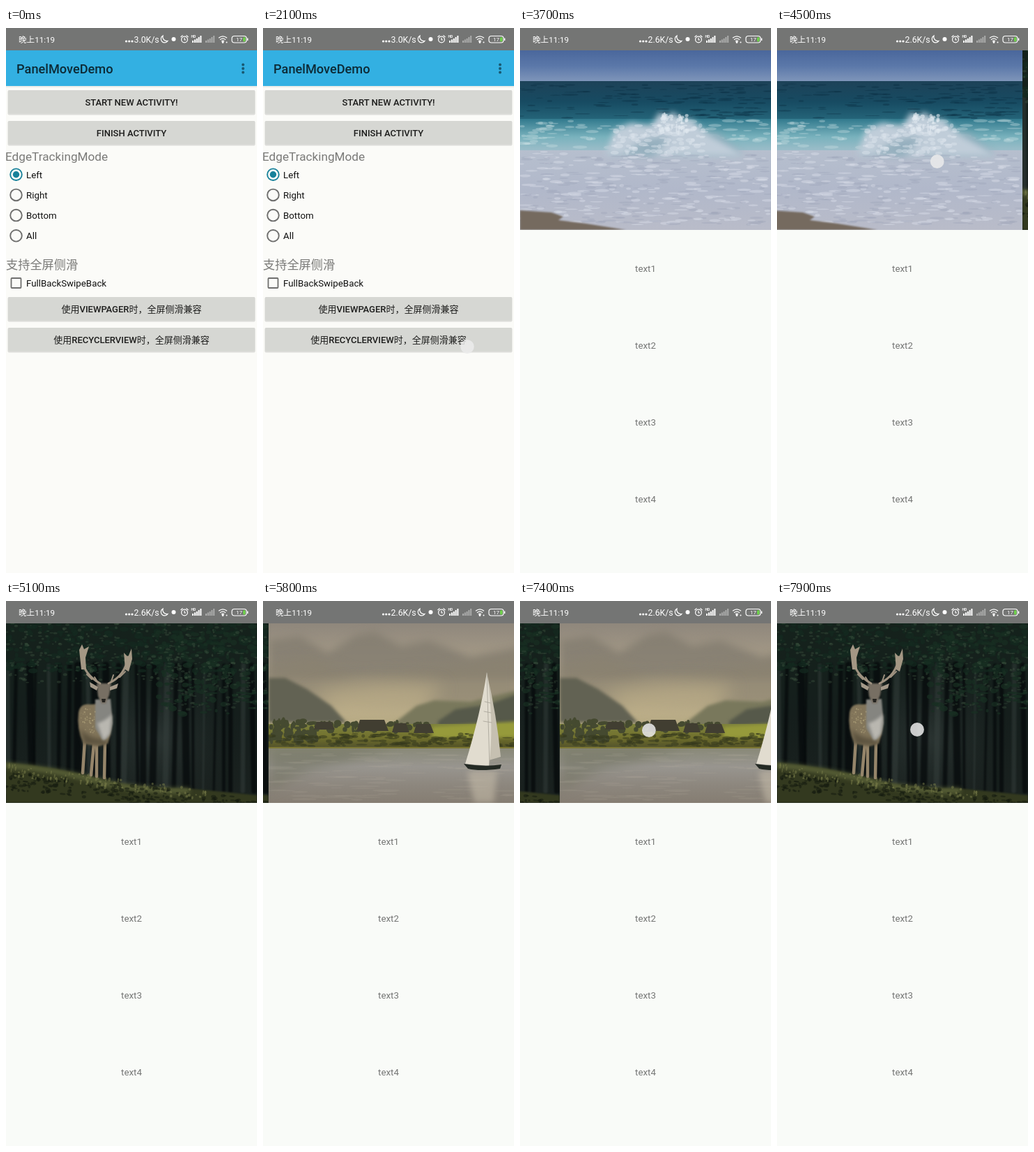
Recreate the animation shown at these times as an HTML page with a canvas. Size 360 px wide and 780 px high, loop 8000 ms.

```html
<!DOCTYPE html>
<html lang="zh">
<head>
<meta charset="utf-8">
<title>PanelMoveDemo</title>
<style>
html, body { margin: 0; width: 100%; height: 100%; overflow: hidden; background: #fbfbf8; }
.layer { position: absolute; left: 0; top: 0; width: 360px; height: 780px; overflow: hidden; }
svg { position: absolute; left: 0; top: 0; font-family: Roboto, "Noto Sans CJK SC", "Noto Sans CJK", sans-serif; }
#main { background: #fbfbf8; }
#detail { background: #f9fbf8; }
#strip { position: absolute; top: 32px; left: 0; width: 1440px; height: 257px; }
#strip canvas { position: absolute; top: 0; }
#dot { position: absolute; left: -10px; top: -10px; width: 20px; height: 20px; border-radius: 50%;
  background: radial-gradient(rgba(236, 236, 236, .85) 65%, rgba(165, 165, 170, .55) 85%, rgba(165, 165, 170, .2) 100%); }
</style>
</head>
<body>
<div class="layer" id="main">
  <svg width="360" height="780">
    <rect y="83" width="360" height="2" fill="#000" opacity=".06"/>
    <rect y="31" width="360" height="52" fill="#33b0e2"/>
    <text x="15" y="65" font-size="18.2" font-weight="500" fill="#0d2b37">PanelMoveDemo</text>
    <g fill="#195871"><circle cx="340" cy="52.5" r="2"/><circle cx="340" cy="58" r="2"/><circle cx="340" cy="63.5" r="2"/></g>
    <g id="buttons" font-size="13" fill="#1d1d1c" text-anchor="middle"></g>
    <g font-size="17.2" fill="#7a7a78">
      <text x="-1" y="190">EdgeTrackingMode</text>
      <text x="0" y="345">支持全屏侧滑</text>
    </g>
    <g id="radios" font-size="13.3" fill="#111"></g>
    <rect x="7.5" y="358" width="14" height="14" rx="1" fill="none" stroke="#6f6f6e" stroke-width="1.8"/>
    <text x="29" y="370" font-size="13.3" fill="#111">FullBackSwipeBack</text>
  </svg>
</div>
<div class="layer" id="detail">
  <div id="strip"></div>
  <svg width="360" height="780"><g id="rows" font-size="13.3" fill="#757675" text-anchor="middle"></g></svg>
</div>
<svg width="360" height="32" fill="#fff">
  <rect width="360" height="32" fill="#747574"/>
  <text x="18" y="21" font-size="11.6">晚上11:19</text>
  <circle cx="172.5" cy="19" r="1.6"/><circle cx="176.7" cy="19" r="1.6"/><circle cx="181" cy="19" r="1.6"/>
  <text id="speed" x="183.5" y="21" font-size="12.3"></text>
  <circle cx="240.5" cy="16" r="3"/>
  <g fill="none" stroke="#fff" stroke-width="1.2">
    <path d="M225 11a5.3 5.3 0 1 0 7 7.5A6 6 0 0 1 225 11Z"/>
    <circle cx="256" cy="16.5" r="4.4"/>
    <path d="M256 14v3h2M250.5 13l3-2.6M261.5 13l-3-2.6"/>
    <path d="M305 14.3q6-5 12 0M307 16.8q4-3.2 8 0M309 19q2-1.6 4 0"/>
    <rect x="324" y="11.5" width="21" height="9.5" rx="3.5"/>
  </g>
  <circle cx="311" cy="20.5" r="1.4"/><circle cx="316.5" cy="20.5" r="1"/>
  <rect x="346" y="14.5" width="1.3" height="3.5"/>
  <rect x="340" y="13" width="3.5" height="6.5" rx="1.5" fill="#6fd24c"/>
  <text x="334.5" y="19.3" font-size="8" text-anchor="middle">17</text>
  <text x="265.5" y="14" font-size="5" font-weight="700">HD</text>
  <path d="M267 18h2v3h-2zM270 16.5h2v4.5h-2zM272.8 15h2v6h-2zM275.6 13h2v8h-2zM278.4 11h2v10h-2z"/>
  <path opacity=".4" d="M286 18h2v3h-2zM288.8 16.5h2v4.5h-2zM291.6 15h2v6h-2zM294.4 13h2v8h-2zM297.2 11h2v10h-2z"/>
</svg>
<div id="dot"></div>
<script>
const $ = id => document.getElementById(id);

// Interface rows
const bold = s => `<tspan font-weight="500">${s}</tspan>`;
const usage = word => `使用${bold(word)}时，全屏侧滑兼容`;
$('buttons').innerHTML = [[89, bold('START NEW ACTIVITY!')], [133, bold('FINISH ACTIVITY')],
  [385, usage('VIEWPAGER')], [429, usage('RECYCLERVIEW')]].map(([y, s]) =>
  `<rect x="2.5" y="${y}" width="355" height="35.5" rx="2" fill="#000" opacity=".12"/>
   <rect x="3" y="${y}" width="354" height="33.5" rx="2" fill="#d6d7d3"/>
   <text x="180" y="${y + 21.5}">${s}</text>`).join('');
$('radios').innerHTML = ['Left', 'Right', 'Bottom', 'All'].map((s, i) => {
  const y = 209.7 + i * 29.2, color = i ? '#6f6f6e' : '#17819a';
  return `<circle cx="14.5" cy="${y}" r="8.3" fill="none" stroke="${color}" stroke-width="1.9"/>
    ${i ? '' : `<circle cx="14.5" cy="${y}" r="4.7" fill="${color}"/>`}<text x="29" y="${y + 4.8}">${s}</text>`;
}).join('');
$('rows').innerHTML = [1, 2, 3, 4, 5].map(n => `<text x="180" y="${239 + n * 110}">text${n}</text>`).join('');

// Painting helpers
let seed = 7;
const rnd = () => (seed = seed * 16807 % 2147483647) / 2147483647;
let g;
function band(y0, y1, ...colors) {
  g.fillStyle = g.createLinearGradient(0, y0, 0, y1);
  colors.forEach((c, i) => g.fillStyle.addColorStop(i / (colors.length - 1), c));
  g.fillRect(0, y0, 360, y1 - y0);
}
function glow(x, y, r, ...colors) {
  g.fillStyle = g.createRadialGradient(x, y, 0, x, y, r);
  colors.forEach((c, i) => g.fillStyle.addColorStop(i / (colors.length - 1), c));
  g.fillRect(x - r, y - r, 2 * r, 2 * r);
}
function shape(color, d, blur = 0) {
  g.filter = blur ? `blur(${blur}px)` : 'none';
  g.fillStyle = color;
  g.fill(new Path2D(d));
  g.filter = 'none';
}
function line(color, width, d, blur = 0) {
  g.filter = blur ? `blur(${blur}px)` : 'none';
  g.strokeStyle = color;
  g.lineWidth = width;
  g.lineCap = 'round';
  g.stroke(new Path2D(d));
  g.filter = 'none';
}
function specks(n, color, x, y, w, h, rx, ry, slope = 0) {
  g.fillStyle = color;
  for (let i = 0; i < n; i++) {
    const dx = rnd() * w;
    g.beginPath();
    g.ellipse(x + dx, y + dx * slope + rnd() * h, rx * (.4 + rnd()), ry * (.4 + rnd()), Math.atan(slope), 0, 7);
    g.fill();
  }
}

function surf() {
  band(0, 45, '#4a679c', '#5b78a9', '#8096ba');
  band(44, 104, '#1d4258', '#174b62', '#286a7e');
  specks(130, 'rgba(10,45,65,.4)', 0, 48, 360, 50, 9, 1);
  band(98, 150, '#31798d', '#79b2bd', '#a8c1cd');
  specks(110, 'rgba(205,225,230,.35)', 0, 100, 360, 40, 8, 2);
  band(143, 257, '#b6bfce', '#b1b8ca', '#b9bcc9');
  shape('#8aacba', 'M125 148L148 118 180 108 225 112 285 118 320 150Z', 4);
  shape('#c0cdd9', 'M122 150L136 114 160 104 187 110 201 88 211 96 218 88 232 98 248 100 268 120 305 140 322 152Z', 4);
  shape('rgba(120,155,172,.6)', 'M150 148Q185 118 215 126L190 152Z', 5);
  specks(90, 'rgba(225,233,240,.4)', 135, 106, 130, 42, 5, 2.5);
  specks(60, 'rgba(225,233,240,.6)', 198, 90, 42, 30, 2.5, 2.5);
  specks(210, 'rgba(218,222,233,.45)', 0, 145, 360, 105, 8, 1.6);
  specks(170, 'rgba(145,155,178,.26)', 0, 150, 360, 100, 8, 1.4);
  shape('#756a5f', 'M0 229L45 232 62 238 55 243 95 248 152 257H0Z', 1);
}

function stag() {
  band(0, 257, '#15221c', '#151e1c', '#1a211f');
  glow(215, 165, 115, 'rgba(62,72,70,.5)', 'rgba(40,48,46,0)');
  for (let i = 0; i < 26; i++)
    line(i % 4 ? 'rgba(6,10,11,.75)' : 'rgba(62,70,68,.4)', 2 + rnd() * 9, `M${i * 14 + rnd() * 8} 60l${rnd() * 8 - 4} 180`, 1);
  specks(330, 'rgba(20,42,31,.7)', 0, -4, 360, 72, 5, 3);
  specks(190, 'rgba(24,47,34,.7)', 215, 0, 145, 130, 5, 3);
  specks(300, 'rgba(62,85,65,.4)', 0, 0, 360, 85, 2.5, 1.5);
  specks(120, 'rgba(62,85,65,.35)', 230, 40, 130, 85, 2.5, 1.5);
  const hill = 'M0 199Q70 205 130 221T260 236L360 246V257H0Z';
  shape('#33391f', hill, 1);
  line('rgba(104,112,66,.8)', 7, 'M0 203Q70 209 130 225T260 239', 3);
  specks(260, 'rgba(18,24,13,.5)', 0, 212, 360, 26, 3, 2, .11);
  specks(110, 'rgba(122,125,74,.5)', 0, 201, 290, 16, 1.5, 2.5, .13);
  line('#95856a', 4.5, 'M113 168L110 214M126 172L122 217M130 170L130 219M142 168L141 221');
  shape('#82755a', 'M104 128Q106 114 121 116L136 115 150 126Q154 150 146 172L132 176 111 172Q101 150 104 128Z', 1);
  shape('rgba(68,60,45,.6)', 'M106 150Q122 168 146 165L144 175 112 173Z', 3);
  shape('#858580', 'M128 109L150 108 153 143Q148 169 138 166L128 150Z', 1);
  shape('#b9b7b0', 'M131 143Q142 140 152 130L149 158 140 168Z', 2);
  shape('#776f63', 'M130 86L151 86 148 103 143 115H137L132 104Z', 1);
  shape('#a49989', 'M132 91L120 84 121 91 130 96ZM149 91L161 86 159 93 149 96Z');
  shape('#24231f', 'M137 108h6l-1 5h-4Z');
  line('#9f9280', 3, 'M135 86Q112 73 110 53M147 86Q171 75 175 48');
  shape('#a39784', 'M108 66L105 38 109 30 112 37 119 33 114 49 115 66ZM171 66L169 42 175 48 180 36 181 51 176 69Z');
  line('#9f9280', 2, 'M123 80L116 73M132 85L127 77M151 83L154 74M163 77L171 69');
  specks(40, 'rgba(196,181,137,.45)', 106, 122, 22, 35, 1, 1);
}

function lake() {
  band(0, 182, '#8f877c', '#aa9f8a', '#bdb08c', '#a59c70');
  shape('rgba(131,124,112,.8)', 'M0 24L45 18 85 42 125 17 152 12 190 32 230 24 290 48 360 34V80H0Z', 6);
  shape('rgba(138,130,112,.7)', 'M0 62L60 50 130 74 210 66 275 60 360 44V120H0Z', 8);
  shape('rgba(188,174,136,.75)', 'M60 102Q150 78 250 92L220 128 110 142Z', 12);
  shape('#626253', 'M0 78L24 78 55 94 90 118 112 142H0Z', 2);
  shape('#79785c', 'M180 143L212 118 238 110 290 112 360 95V150H180Z', 2);
  shape('#56594a', 'M243 140L268 123 315 116 360 100V150H243Z', 2);
  band(144, 181, '#7d813d', '#72722e', '#4b4a24');
  shape('#969a3b', 'M235 148L360 140V163L235 164Z', 2);
  specks(90, '#454a30', 0, 139, 70, 30, 4, 4);
  specks(45, '#454a30', 70, 142, 165, 12, 4, 4);
  specks(150, 'rgba(52,56,30,.55)', 0, 158, 360, 18, 6, 2);
  shape('#413e31', 'M65 152l4-11h21l5 11ZM126 154l5-16h35l6 16ZM177 156l4-13h16l5 13ZM208 157l4-13h20l5 13Z');
  band(179, 257, '#898978', '#98958f', '#8d877e', '#857d72');
  shape('rgba(104,108,88,.45)', 'M0 180H180L60 210 0 240Z', 8);
  line('#a79d40', 1, 'M0 178H360');
  specks(90, 'rgba(183,176,164,.13)', 0, 185, 360, 68, 18, 1.2);
  shape('rgba(205,195,176,.5)', 'M285 212h43l-5 45h-28Z', 4);
  shape('#c6c0b1', 'M313 71Q327 130 333 191L316 196Z');
  shape('#e1dccf', 'M313 70Q304 130 282 201L316 204Q324 145 313 70Z');
  line('#a5a196', .8, 'M313 71L317 203M310 112l8 2M309 126l10 2M308 140l12 2');
  shape('#242a24', 'M280 201Q310 206 334 202L332 208Q303 212 286 208Z');
}

function falls() {
  band(0, 160, '#17506f', '#1b5574', '#142c3b');
  glow(115, 70, 150, 'rgba(43,112,150,.6)', 'rgba(18,55,80,0)');
  shape('rgba(4,16,27,.85)', 'M175 -30H400V170L250 130Z', 26);
  glow(53, 0, 110, '#fff', '#c8e9f4', 'rgba(80,160,195,.7)', 'rgba(50,120,160,.25)', 'rgba(40,100,140,0)');
  shape('rgba(6,18,27,.8)', 'M-20 135L120 142 380 135V170H-20Z', 9);
  specks(70, 'rgba(205,230,240,.5)', 60, 15, 300, 115, .6, .6);
  glow(122, 79, 5, '#fff', 'rgba(120,200,235,0)');
  glow(103, 92, 3, '#def', 'rgba(120,200,235,0)');
  band(152, 257, '#10191f', '#141e26', '#090d11');
  specks(120, 'rgba(110,140,160,.22)', 0, 148, 360, 34, 14, 1.2, .03);
  line('rgba(115,150,172,.5)', 6, 'M0 188Q60 205 130 232M60 150Q120 165 200 157T360 160M5 214Q70 215 125 238', 4);
  specks(70, 'rgba(135,160,178,.25)', 0, 185, 120, 30, 12, 1.4, .25);
  shape('#0a1015', 'M128 182L160 172 205 176 272 166 360 168V186L290 180 210 188 130 198Z', 2);
  shape('#2a4a5e', 'M113 208Q125 188 165 187L270 180 360 182V226L265 236 150 230Z', 4);
  for (let x = 116; x < 360; x += 2.5) {
    const y = 192 - 6 * Math.sin((x - 110) / 40) + rnd() * 6;
    const light = .25 + .25 * Math.sin(x / 9) + .2 * rnd();
    line(`rgba(160,203,226,${Math.max(.05, light)})`, 2, `M${x} ${y}q3 8 2 ${25 + rnd() * 16}`, .8);
  }
  shape('#090d11', 'M88 236L120 226 150 232 190 240 235 226 280 229 360 220V257H80Z', 2);
  shape('rgba(10,16,21,.9)', 'M205 186L235 184 245 200 238 226 218 228Z', 4);
  shape('rgba(125,165,188,.7)', 'M225 240Q255 218 285 238L265 246Z', 5);
  specks(110, 'rgba(75,90,99,.35)', 100, 230, 260, 26, 4, 1.3);
  specks(60, 'rgba(95,112,122,.35)', 130, 170, 230, 14, 5, 1.3);
}

[surf, stag, lake, falls].forEach((paint, i) => {
  const c = document.createElement('canvas');
  c.width = 360;
  c.height = 257;
  c.style.left = i * 360 + 'px';
  $('strip').append(c);
  g = c.getContext('2d');
  paint();
});

// Motion: [start ms, direction, finger x, finger y]
const swipes = [[4447, 1, 238, 191], [5253, 1, 240, 190], [5930, 1, 242, 188], [6607, -1, 125, 186], [7250, -1, 128, 185]];
const clamp = v => Math.max(0, Math.min(1, v));
const smooth = v => v * v * (3 - 2 * v);
const progress = (t, start) => smooth(clamp((t - start) / 600));

function finger(t) {
  if (t >= 2050 && t < 2250) return [293, 456];
  if (t >= 7860) return [201, 184];
  for (const [start, dir, x, y] of swipes)
    if (t > start - 110 && t < start + 180) return [x - dir * 360 * progress(t, start), y];
}

function draw(now) {
  const t = now % 8000;
  const enter = 1 - (1 - clamp((t - 2300) / 500)) ** 3;
  const page = swipes.reduce((p, [start, dir]) => p + dir * progress(t, start), 0);
  $('main').style.transform = `translateX(${-90 * enter}px)`;
  $('detail').style.transform = `translateX(${360 * (1 - enter)}px)`;
  $('strip').style.transform = `translateX(${Math.round(-360 * page)}px)`;
  $('speed').textContent = t < 2600 ? '3.0K/s' : '2.6K/s';
  const at = finger(t);
  $('dot').style.visibility = at ? 'visible' : 'hidden';
  if (at) $('dot').style.transform = `translate(${at[0]}px, ${at[1]}px)`;
}

const begin = performance.now();
function tick() {
  draw(performance.now() - begin);
  requestAnimationFrame(tick);
}
tick();
</script>
</body>
</html>
```
